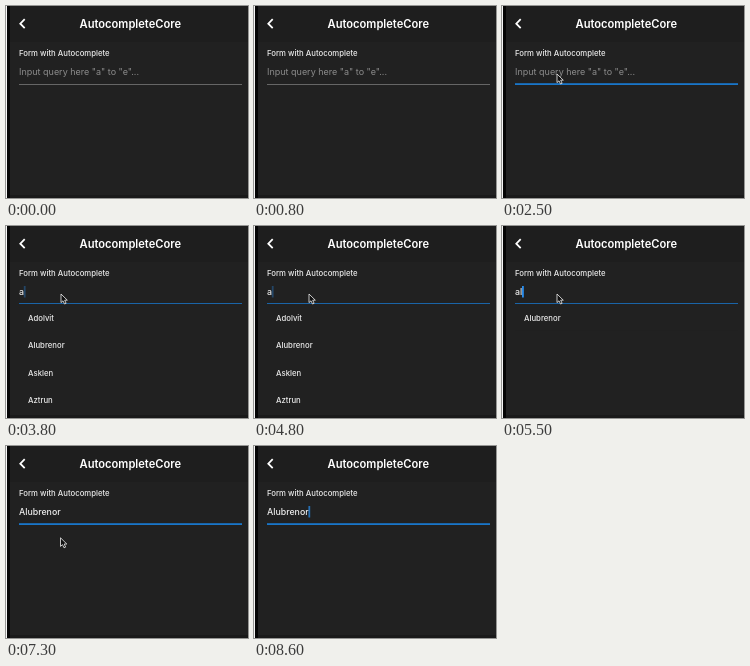
Recreate the animation shown at these times as an HTML page. Size 242 by 192 pixels, loop 8.7 s.

```html
<!DOCTYPE html>
<html lang="en">
<head>
<meta charset="utf-8">
<title>Autocomplete demo</title>
<style>
  html, body { margin: 0; width: 100%; height: 100%; overflow: hidden; background: #212121; }
  svg { display: block; width: 100vw; height: 100vh; }
  text { font-family: Inter, Roboto, sans-serif; font-weight: 500; fill: #ececec; white-space: pre; }
  .title { font-size: 11.15px; font-weight: 600; fill: #fff; text-anchor: middle; }
  .label { font-size: 7.75px; }
  .field { font-size: 8.8px; }
  .hint { font-size: 9px; font-weight: 400; fill: #8c8c8c; }
  .option { font-size: 7.75px; }
</style>
</head>
<body>
<svg viewBox="0 0 242 192">
  <rect width="242" height="192" fill="#212121"/>
  <rect width="242" height="36" fill="#1e1e1e"/>
  <rect y="189" width="242" height="3" fill="#1a1a1a"/>
  <rect width="4" height="192" fill="#050505"/>
  <rect width="1" height="192" fill="#f4f4f4"/>
  <path d="M18.7 13.2 L14.3 17.7 L18.7 22.2" fill="none" stroke="#fff" stroke-width="1.8"/>
  <text class="title" x="124.3" y="21.8">AutocompleteCore</text>
  <text class="label" x="13" y="50">Form with Autocomplete</text>
  <text class="hint" id="hint" x="13" y="69">Input query here "a" to "e"...</text>
  <text class="field" id="field" x="13" y="69"></text>
  <rect id="caret" y="60" width="1.8" height="11.5" fill="#2a8ff0"/>
  <rect x="13" y="78" width="223" height="1" fill="#666"/>
  <rect id="focusLine" x="13" y="77.2" width="223" height="1.8" fill="#1976c9"/>
  <g id="list">
    <rect id="panel" x="13" y="78" width="223" fill="#212121"/>
    <rect id="hover" x="13" y="79" width="223" height="25.5" fill="#292929"/>
    <circle id="ripple" cx="54.5" cy="94" fill="#6b6b6b"/>
    <g id="options"></g>
  </g>
  <path id="pointer" d="M0 0 V8.6 L2 6.8 L3.5 10 L5.1 9.3 L3.7 6.2 H6.3 Z"
        fill="#111" stroke="#f2f2f2" stroke-width="0.8" stroke-linejoin="round"/>
</svg>
<script>
const LOOP = 8700;
const names = ["Adolvit", "Alubrenor", "Asklen", "Aztrun"];
const time = { enter: 1000, focus: 1500, typeA: 2760, typeL: 5260, move: 5700, press: 6150, pick: 6500, leave: 7800 };
const inputs = [[time.focus, ""], [time.typeA, "a"], [time.typeL, "al"], [time.pick, names[1]]];

const el = id => document.getElementById(id);
const set = (id, attrs) => {
  for (const key in attrs) el(id).setAttribute(key, attrs[key]);
};
const show = (id, on) => set(id, { visibility: on ? "visible" : "hidden" });
const progress = (t, start, length) => Math.min(1, Math.max(0, (t - start) / length));
const ease = p => p * p * (3 - 2 * p);
const easeOut = p => 1 - (1 - p) ** 2;

const options = names.map(name => {
  const node = document.createElementNS("http://www.w3.org/2000/svg", "text");
  node.setAttribute("class", "option");
  node.setAttribute("x", 22);
  node.textContent = name;
  el("options").append(node);
  return node;
});

// The caret stays lit after each input, then fades out and in every half second.
function caretOpacity(age) {
  const phase = Math.floor(age / 500);
  const fade = easeOut(progress(age % 500, 0, 220));
  return phase === 0 ? 1 : phase % 2 ? 1 - fade : fade;
}

function drawField(t) {
  const [since, value] = inputs.filter(([start]) => t >= start).pop() || [Infinity, ""];
  const focused = t >= time.focus;
  el("field").textContent = value;
  show("hint", !value);
  show("caret", focused);
  if (focused) {
    const width = value ? el("field").getComputedTextLength() : 0;
    set("caret", { x: 12.8 + width, opacity: caretOpacity(t - since) });
  }
  set("focusLine", { opacity: progress(t, time.focus + 20, 180) });
}

function drawList(t) {
  const open = t >= time.typeA && t < time.pick;
  const filtered = t >= time.typeL;
  el("list").style.display = open ? "" : "none";
  set("panel", { height: filtered ? 26.5 : 110 });
  options.forEach((node, i) => {
    node.setAttribute("y", filtered ? 94.8 : 94.8 + i * 27.4);
    node.style.display = !filtered || i === 1 ? "" : "none";
  });
  set("hover", { opacity: progress(t, time.move + 250, 100) });
  const press = progress(t, time.press, 250);
  set("ripple", { r: 6 * ease(press), opacity: 0.75 * press });
}

function drawPointer(t) {
  const move = ease(progress(t, time.move, 350));
  show("pointer", t >= time.enter && t < time.leave);
  set("pointer", { transform: `translate(${55 - 0.5 * move} ${68 + 23.8 * move})` });
}

function draw(now) {
  const t = now % LOOP;
  drawField(t);
  drawList(t);
  drawPointer(t);
}

const began = performance.now();
function tick() {
  draw(performance.now() - began);
  requestAnimationFrame(tick);
}
tick();
</script>
</body>
</html>
```
